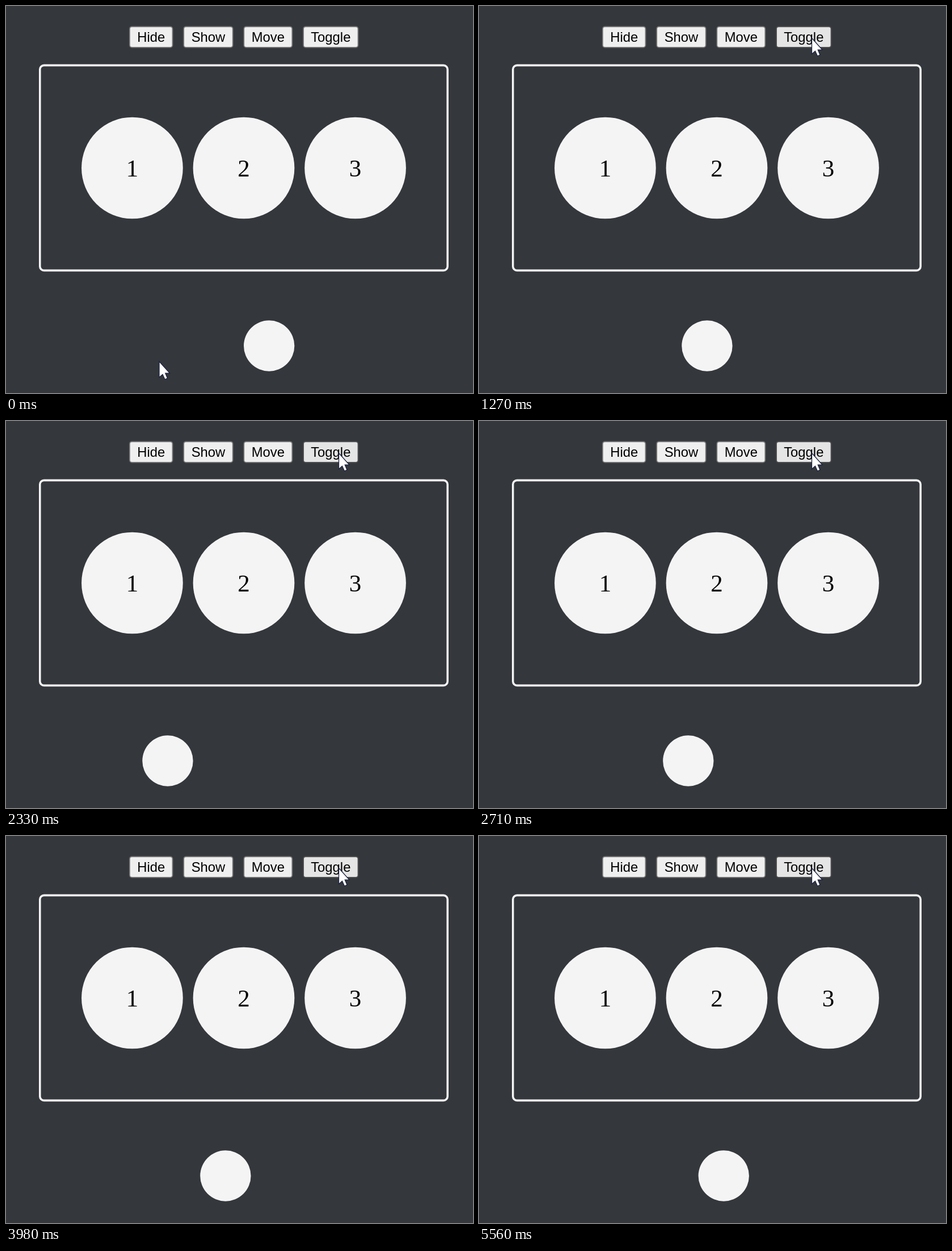
These frames come from a looping animation (823 px wide and 681 px high, 5640 ms). An HTML page with a canvas:

```html
<!DOCTYPE html>
<html lang="en">
<head>
<meta charset="utf-8">
<title>Move and toggle</title>
<style>
  html, body { margin: 0; width: 100%; height: 100%; overflow: hidden; background: #34373c; }
  canvas { display: block; }
</style>
</head>
<body>
<canvas id="stage" width="823" height="681"></canvas>
<script>
const ctx = document.getElementById('stage').getContext('2d');
const LOOP = 5640;
const UNIT = 1.787;
const LIGHT = '#f4f4f4';
const CENTER = 419;

const BUTTONS = [
  ['Hide', 217, 77.4],
  ['Show', 312.3, 88.3],
  ['Move', 418.4, 86.8],
  ['Toggle', 523.2, 98.2]
];
const LOOKS = {
  idle: ['#efefef', '#767676'],
  hover: ['#e5e5e5', '#4f4f4f'],
  active: ['#f5f5f5', '#8d8d8d']
};

const CURSOR_ARRIVES = 560;
const CLICKS = [
  { press: 800, release: 970, start: 931, span: 830 },
  { press: 2160, release: 2330, start: 2346, span: 755 },
  { press: 3510, release: 3660, start: 3559, span: 917 },
  { press: 4840, release: 5010, start: 4975, span: 830 }
];

// The picture is refreshed in bursts: [first, last, count]
const BURSTS = [
  [0, 0, 1], [150, 560, 6],
  [800, 800, 1], [970, 1510, 8], [1580, 1670, 2], [1740, 1830, 2],
  [2160, 2160, 1], [2330, 2870, 8], [2950, 3180, 4],
  [3510, 3510, 1], [3660, 4220, 8], [4290, 4520, 4],
  [4840, 4840, 1], [5010, 5560, 8]
];
const TICKS = BURSTS.flatMap(([first, last, n]) =>
  Array.from({ length: n }, (_, i) =>
    n < 2 ? first : Math.floor((first + (last - first) * i / (n - 1)) / 10) * 10));

const clamp = v => Math.min(1, Math.max(0, v));

// cubic-bezier(.42, 0, .58, 1)
function easeInOut(u) {
  let lo = 0, hi = 1;
  for (let i = 0; i < 24; i++) {
    const s = (lo + hi) / 2, r = 1 - s;
    const x = 1.26 * s * r * r + 1.74 * s * s * r + s * s * s;
    if (x < u) lo = s; else hi = s;
  }
  return lo * lo * (3 - 2 * lo);
}

function disc(x, y, r) {
  ctx.fillStyle = LIGHT;
  ctx.beginPath();
  ctx.arc(x, y, r, 0, Math.PI * 2);
  ctx.fill();
}

function label(text, x, y, font) {
  ctx.font = font;
  ctx.textAlign = 'center';
  ctx.fillStyle = '#000';
  ctx.fillText(text, x, y);
}

function outlined(x, y, w, h, radius, line, stroke, fill) {
  ctx.beginPath();
  ctx.roundRect(x + line / 2, y + line / 2, w - line, h - line, radius - line / 2);
  if (fill) {
    ctx.fillStyle = fill;
    ctx.fill();
  }
  ctx.lineWidth = line;
  ctx.strokeStyle = stroke;
  ctx.stroke();
}

function drawButton([text, x, w], state) {
  const [fill, border] = LOOKS[state];
  outlined(x, 35.4, w, 38.3, 5, UNIT, border, fill);
  label(text, x + w / 2, 62.5, '23.83px "Liberation Sans", Arial, sans-serif');
}

function drawCursor(t) {
  const u = clamp((t - 90) / (CURSOR_ARRIVES - 90));
  const s = u * u * (3 - 2 * u);
  const curve = (a, b, c) => a * (1 - s) ** 2 + 2 * b * s * (1 - s) + c * s * s;
  ctx.save();
  ctx.translate(curve(270, 220, 586.5), curve(625.5, 340, 56.5));
  ctx.beginPath();
  [[0, 0], [0, 28], [6, 22.8], [10, 31.5], [14.5, 29.5], [10.8, 20.6], [18.5, 20.6]]
    .forEach(([x, y]) => ctx.lineTo(x, y));
  ctx.closePath();
  ctx.fillStyle = '#fff';
  ctx.fill();
  ctx.lineWidth = 1.3;
  ctx.strokeStyle = '#1c2240';
  ctx.stroke();
  ctx.restore();
}

function ballX(t) {
  const shift = CLICKS.reduce((sum, c, i) =>
    sum + (i % 2 ? 1 : -1) * easeInOut(clamp((t - c.start) / c.span)), 0);
  return CENTER + 25 * UNIT + 100 * UNIT * shift;
}

function draw(t) {
  ctx.fillStyle = '#34373c';
  ctx.fillRect(0, 0, 823, 681);

  const pressed = CLICKS.some(c => t >= c.press && t < c.release);
  const toggle = pressed ? 'active' : t >= CURSOR_ARRIVES ? 'hover' : 'idle';
  BUTTONS.forEach((b, i) => drawButton(b, i === 3 ? toggle : 'idle'));

  outlined(58, 102.6, 404 * UNIT, 204 * UNIT, 5 * UNIT, 2 * UNIT, LIGHT);
  [1, 2, 3].forEach(n => {
    const x = CENTER + (n - 2) * 110 * UNIT;
    disc(x, 285, 50 * UNIT);
    label(n, x, 299.5, '42.9px "Liberation Serif", "Times New Roman", serif');
  });

  disc(ballX(t), 598, 25 * UNIT);
  drawCursor(t);
}

function frame() {
  const t = performance.now() % LOOP;
  draw(TICKS.findLast(tick => tick <= t));
  requestAnimationFrame(frame);
}
frame();
</script>
</body>
</html>
```
